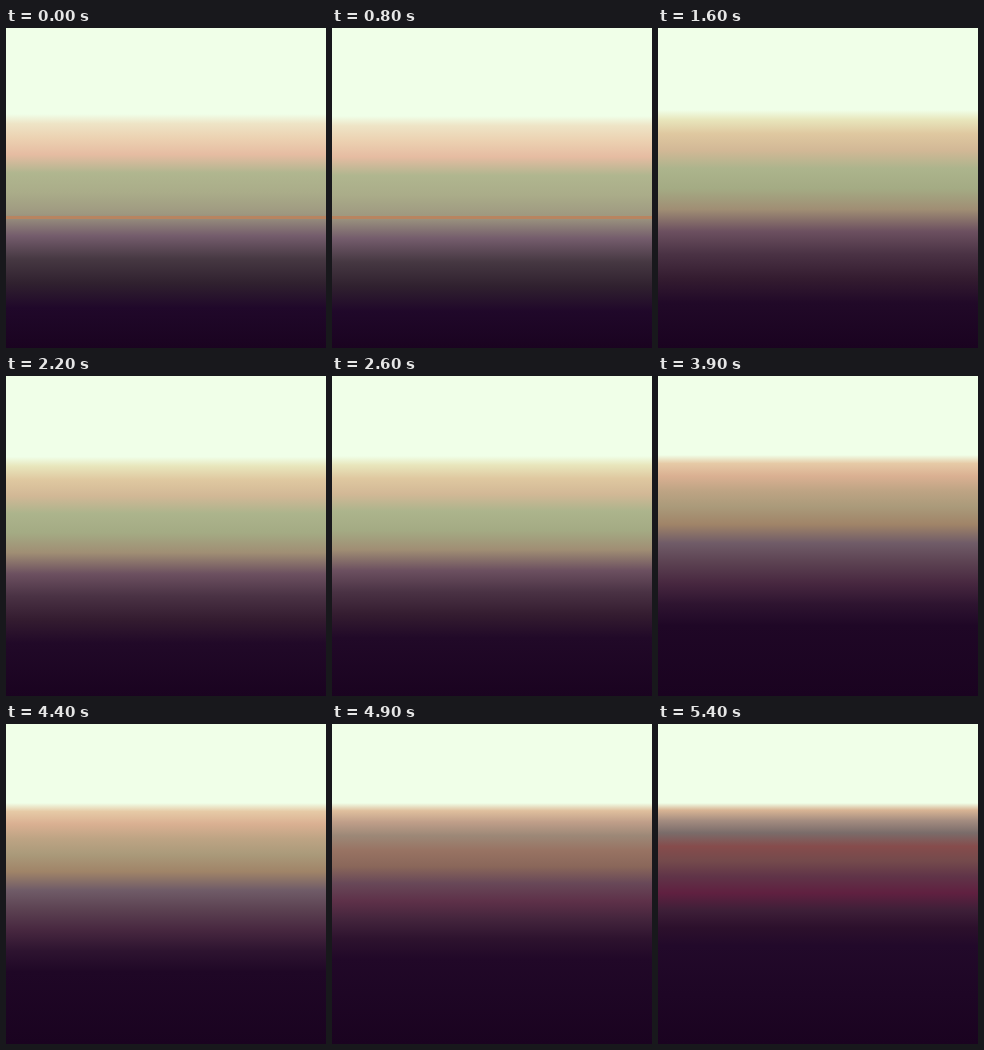
Write an HTML page with a canvas that moves like this. It is 320 by 320 pixels and loops after 5.5 s.

```html
<!DOCTYPE html>
<html lang="en">
<head>
<meta charset="utf-8">
<title>Dusk gradient</title>
<style>
  html, body { margin: 0; width: 100%; height: 100%; overflow: hidden; }
  canvas { display: block; width: 100%; height: 100%; }
</style>
</head>
<body>
<canvas id="stage" width="320" height="320"></canvas>
<script>
const SIZE = 320, LOOP = 5500, STEP = 100;
const SKY = '#f0ffe8', GROUND = '#1a0320', GLOW = '#b88460';
const ctx = document.getElementById('stage').getContext('2d');

const parse = hex => [0, 2, 4].map(i => parseInt(hex.slice(i, i + 2), 16));
const palette = list => list.split(' ').map(parse);
const mix = (a, b, t) => a + (b - a) * t;
const clamp = x => Math.min(1, Math.max(0, x));

// Colours from just below the horizon down to the dark ground.
const clear = palette('eee4c6 ecd2b2 e6bca2 b0b68f aaac89 9e9880 745c6c 463842 30212f 20082a');
const soft = palette('e8e6bc dfc8a0 d2b896 acb48c a4ab84 a08e74 6c5060 4a3244 341c30 210928');
const warm = palette('e6caa6 dab092 bea484 aa9a7a a08468 705c68 5c4252 482840 2e1430 1f0726');
const ember = palette('d8b494 a48c80 7a6c6a 864c4c 744a4c 603448 602040 3e1f38 2c102c 22092a');

const key = (time, horizon, floor, colors) => ({ time, horizon, floor, colors });
const keys = [
  key(0, 86, 280, clear),
  key(800, 88, 283, clear),
  key(1600, 82, 275, soft),
  key(2600, 80, 262, soft),
  key(3300, 79, 252, warm),
  key(4400, 79, 248, warm),
  key(5400, 79, 222, ember)
];

function draw(time) {
  const next = Math.max(1, keys.findIndex(k => k.time >= time));
  const a = keys[next - 1], b = keys[next];
  const t = (time - a.time) / (b.time - a.time);
  const horizon = mix(a.horizon, b.horizon, t);
  const floor = mix(a.floor, b.floor, t);

  const gradient = ctx.createLinearGradient(0, 0, 0, SIZE);
  gradient.addColorStop(horizon / SIZE, SKY);
  a.colors.forEach((color, i) => {
    // Bands sit closer together near the horizon.
    const depth = ((i + 1) / a.colors.length) ** 1.3;
    const rgb = color.map((c, n) => Math.round(mix(c, b.colors[i][n], t)));
    gradient.addColorStop(mix(horizon, floor, depth) / SIZE, `rgb(${rgb})`);
  });
  gradient.addColorStop(1, GROUND);
  ctx.fillStyle = gradient;
  ctx.fillRect(0, 0, SIZE, SIZE);

  // A thin glowing line that fades as the light goes.
  ctx.globalAlpha = clamp(2 - time / 800);
  ctx.fillStyle = GLOW;
  ctx.fillRect(0, 188, SIZE, 3);
  ctx.globalAlpha = 1;
}

function tick() {
  draw(Math.floor(performance.now() % LOOP / STEP) * STEP);
  requestAnimationFrame(tick);
}
tick();
</script>
</body>
</html>
```
